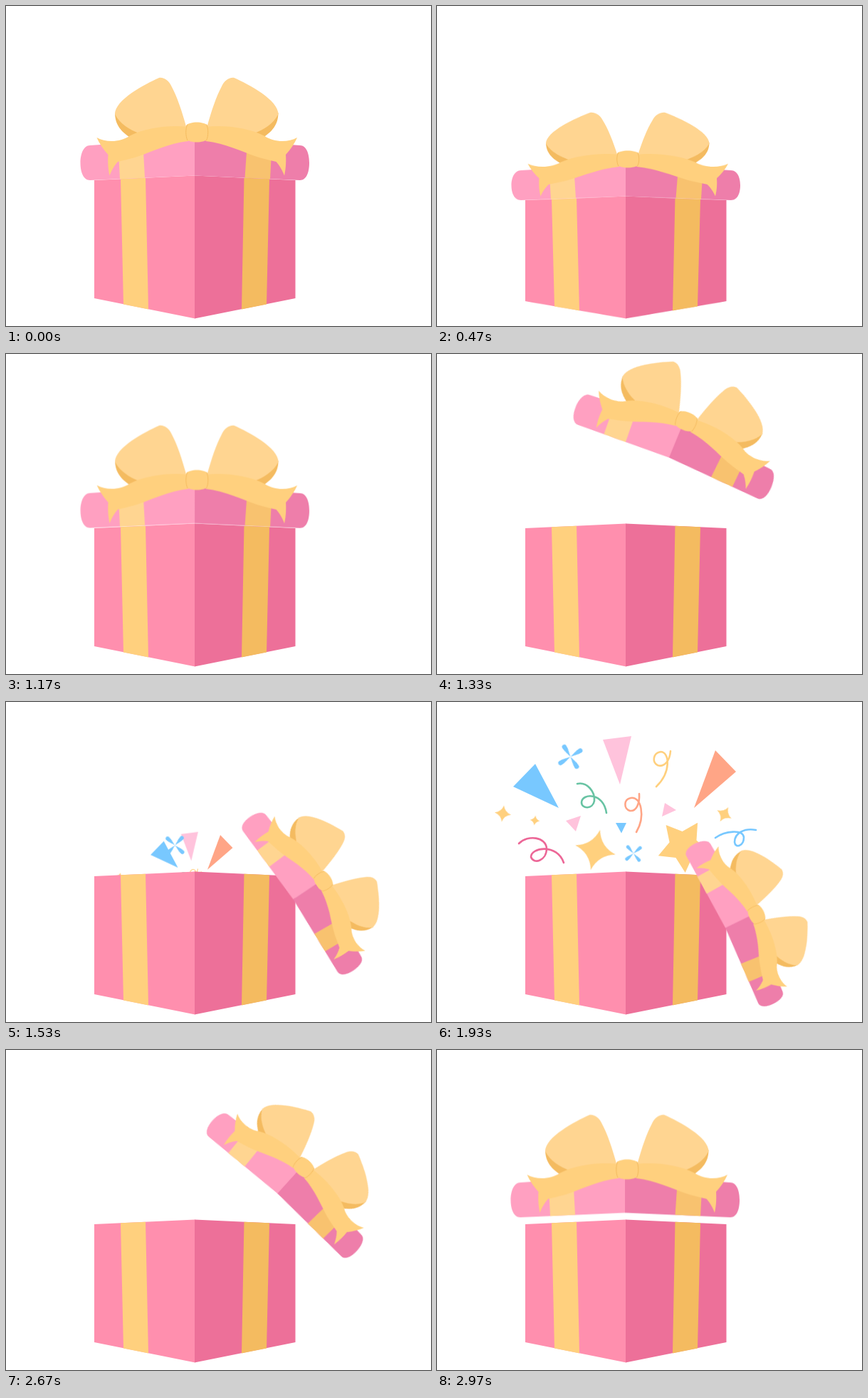
Recreate the animation shown at these times as an HTML page. Size 597 by 450 pixels, loop 3010 ms.

```html
<!DOCTYPE html>
<html lang="en">
<head>
<meta charset="utf-8">
<title>Gift box</title>
<style>
html, body { margin: 0; width: 100%; height: 100%; overflow: hidden; background: #fff; }
svg { display: block; width: 597px; height: 450px; }

#gift, #slide, #lift, #tilt, #confetti, #confetti > * { animation: 3010ms linear infinite both; }

#gift { transform-origin: 265px 439.5px; animation-name: squash; }
#slide { animation-name: slide; }
#lift { animation-name: lift; }
#tilt { transform-origin: 268px 178px; animation-name: tilt; }
#confetti { animation-name: show; }
#confetti > * {
  --s: .42; --r: 0deg;
  transform-box: fill-box; transform-origin: center;
  animation-name: burst;
}
#confetti > .late { animation-name: burst-late; }
#confetti > .cross { --s: .8; --r: -22deg; }

.gold { fill: #ffd07e; }
.amber { fill: #f4bb60; }
.cream { fill: #ffd591; }
.blue { fill: #78c8ff; }
.blush { fill: #ffc3dc; }
.coral { fill: #ffa586; }
.curl { fill: none; stroke-width: 2.6; stroke-linecap: round; }

@keyframes squash {
  0% { transform: scaleY(1); animation-timing-function: cubic-bezier(.42,0,.58,1); }
  18.8% { transform: scaleY(.847); animation-timing-function: cubic-bezier(.42,0,.58,1); }
  38.87%, 100% { transform: scaleY(1); }
}
@keyframes slide {
  0%, 38.87% { transform: translateX(0); animation-timing-function: cubic-bezier(.35,.1,.65,1); }
  50.83% { transform: translateX(177.5px); animation-timing-function: ease-out; }
  56%, 82% { transform: translateX(180.5px); animation-timing-function: cubic-bezier(.33,0,.67,.33); }
  88.7% { transform: translateX(150px); animation-timing-function: cubic-bezier(.4,.24,.6,1); }
  98.67% { transform: translateX(-1px); }
  100% { transform: translateX(0); }
}
@keyframes lift {
  0%, 38.87% { transform: translateY(0); animation-timing-function: cubic-bezier(.3,.2,.6,1); }
  44.2% { transform: translateY(-83px); animation-timing-function: cubic-bezier(.38,0,.58,1); }
  54.8% { transform: translateY(133px); animation-timing-function: ease-in-out; }
  61%, 82% { transform: translateY(121px); animation-timing-function: cubic-bezier(.38,0,.62,1); }
  93.8% { transform: translateY(-97px); animation-timing-function: cubic-bezier(.38,0,.62,1); }
  100% { transform: translateY(0); }
}
@keyframes tilt {
  0%, 38.87% { transform: rotate(0deg) scale(1); animation-timing-function: cubic-bezier(.4,.1,.65,.9); }
  50.83% { transform: rotate(56deg) scale(.81); animation-timing-function: ease-out; }
  56% { transform: rotate(66deg) scale(.78); animation-timing-function: ease-in-out; }
  61%, 82% { transform: rotate(64deg) scale(.78); animation-timing-function: cubic-bezier(.33,0,.67,.4); }
  88.7% { transform: rotate(42.2deg) scale(.85); animation-timing-function: cubic-bezier(.4,.3,.6,1); }
  98.67%, 100% { transform: rotate(0deg) scale(1); }
}
@keyframes show {
  0%, 48.5% { visibility: hidden; }
  48.6%, 85% { visibility: visible; }
  85.1%, 100% { visibility: hidden; }
}
@keyframes burst {
  0%, 48.6% { transform: translate(var(--x), var(--y)) rotate(var(--r)) scale(var(--s)); animation-timing-function: cubic-bezier(.33,.67,.67,1); }
  62%, 74.5% { transform: translate(0, 0) rotate(0deg) scale(1); animation-timing-function: cubic-bezier(.33,0,.67,.33); }
  85%, 100% { transform: translate(var(--x), var(--y)) rotate(var(--r)) scale(var(--s)); }
}
@keyframes burst-late {
  0%, 50.4% { transform: translate(var(--x), var(--y)) rotate(var(--r)) scale(var(--s)); animation-timing-function: cubic-bezier(.33,.67,.67,1); }
  63.5%, 74.5% { transform: translate(0, 0) rotate(0deg) scale(1); animation-timing-function: cubic-bezier(.33,0,.67,.33); }
  85%, 100% { transform: translate(var(--x), var(--y)) rotate(var(--r)) scale(var(--s)); }
}
</style>
</head>
<body>
<svg viewBox="0 0 597 450" xmlns="http://www.w3.org/2000/svg">
  <defs>
    <path id="petal" d="M0 0C6-1 11-3.5 17-3.2C20.5-3 20.5 3 17 3.2C11 3.5 6 1 0 0Z"/>
    <g id="cross">
      <use href="#petal"/>
      <use href="#petal" transform="rotate(90)"/>
      <use href="#petal" transform="rotate(180)"/>
      <use href="#petal" transform="rotate(270)"/>
    </g>
    <path id="sparkle" d="M0-29Q6-6 29 0Q6 6 0 29Q-6 6-29 0Q-6-6 0-29Z"/>
    <g id="loop">
      <path class="amber" d="M153 150C153 168 163 177 173 184L205 178L187 170Z"/>
      <path class="cream" d="M215 101C195 110 153 132 153 152C160 166 174 174 187 179L254 173C247 147 240 127 233 114C229 105 222 100 215 101Z"/>
    </g>
    <path id="tail" class="gold" d="M127.500 185C140 192 160 192 173 183C195 171 230 167 256 170L256 190C228 193 205 205 187 211C175 215 165 217 157 219C151 226 148 232 145.500 238.500C143 227 143 217 143.500 209C137 202 131 193 127.500 185Z"/>
  </defs>

  <g id="confetti">
    <path class="blue" d="M138 87L107 119L171 149Z"/>
    <path class="blush" d="M233 53L273 48L257 116Z"/>
    <path class="coral" d="M391 68L420 98L361 149Z"/>
    <g class="blue cross"><use href="#cross" transform="translate(187.500 77) rotate(58)"/></g>
    <g class="blue late"><use href="#cross" transform="translate(276 213) rotate(50) scale(.74)"/></g>
    <path class="blush late" d="M202 160L181 167L195 182Z"/>
    <path class="blush late" d="M320 142L336 152L316 161Z"/>
    <path class="blue late" d="M251 170H266L259 184.500Z"/>
    <path id="star" class="gold late"/>
    <g class="gold late"><use href="#sparkle" transform="translate(222.500 208) rotate(13)"/></g>
    <g class="gold late" data-from="165,252"><use href="#sparkle" transform="translate(92.500 157) rotate(8) scale(.4)"/></g>
    <g class="gold late"><use href="#sparkle" transform="translate(137.500 166.500) rotate(8) scale(.24)"/></g>
    <g class="gold late"><use href="#sparkle" transform="translate(403.500 158) rotate(30) scale(.4)"/></g>
    <path class="curl late" stroke="#68c3a3" d="M197 115C211 112 222 126 221 139C219 151 203 151 203 141C204 128 234 127 238 156"/>
    <path class="curl late" stroke="#ffd07e" d="M328 69C327 83 319 92 310 89C302 85 303 72 314 70C327 70 329 99 308 119"/>
    <path class="curl late" stroke="#ffa586" d="M284 129C285 143 280 154 271 153C262 150 262 137 272 135C287 132 293 161 280 183"/>
    <path class="curl late" stroke="#ec6797" d="M115 199C128 186 153 190 154 206C154 223 136 229 132 218C132 204 169 199 178 226"/>
    <path class="curl late" stroke="#78c8ff" d="M391 191C405 181 429 179 431 190C431 203 419 206 418 197C418 184 432 177 448 180"/>
  </g>

  <g id="gift">
    <path fill="#ff8fae" d="M124 245L265.500 238.500V439.500L124 411Z"/>
    <path fill="#ed7099" d="M265 238.500L406.500 245V411L265 439.500Z"/>
    <path class="gold" d="M161 243.300L196 241.700L200 426.500L165 419.500Z"/>
    <path class="amber" d="M334.500 241.700L370 243.300L366 419.500L331 426.500Z"/>

    <g id="slide"><g id="lift"><g id="tilt">
      <path fill="#ffa0c1" d="M265.500 186L118 196C109 196 104.500 208 104.500 220.500C104.500 234 109 245 118 245L265.500 238.500Z"/>
      <path fill="#ee7eaa" d="M265 186L413 196C422 196 426 208 426 220.500C426 234 422 245 413 245L265 238.500Z"/>
      <path class="cream" d="M158 205H193L195 241.600L160 243.200Z"/>
      <path fill="#f8c26f" d="M338 205H373L371 243.200L335.500 241.600Z"/>
      <use href="#loop"/>
      <use href="#loop" transform="translate(535.500) scale(-1 1)"/>
      <use href="#tail"/>
      <use href="#tail" transform="translate(536.500) scale(-1 1)"/>
      <path class="gold" d="M253 168C258 162 278 162 283 168C285 174 285 182 283 187C278 193 258 193 253 187C252 182 252 174 253 168Z"/>
      <path fill="none" stroke="#f4bb60" d="M255 166.500C252 172 252 183 255 189M281.500 166.500C284.500 172 284.500 183 281.500 189"/>
    </g></g></g>
  </g>
</svg>
<script>
const starPoint = (_, i) => {
  const a = (-130 + i * 36) * Math.PI / 180;
  const r = i % 2 ? 20 : 38;
  return [346 + r * Math.cos(a), 202 + r * Math.sin(a)].map(v => v.toFixed(1));
};
document.getElementById('star')
  .setAttribute('d', 'M' + Array.from({ length: 10 }, starPoint).join('L') + 'Z');

// Every piece bursts out of a point inside the box.
for (const piece of document.getElementById('confetti').children) {
  const box = piece.getBBox();
  const [x, y] = (piece.dataset.from || '260,258').split(',');
  piece.style.setProperty('--x', x - box.x - box.width / 2 + 'px');
  piece.style.setProperty('--y', y - box.y - box.height / 2 + 'px');
}
</script>
</body>
</html>
```
